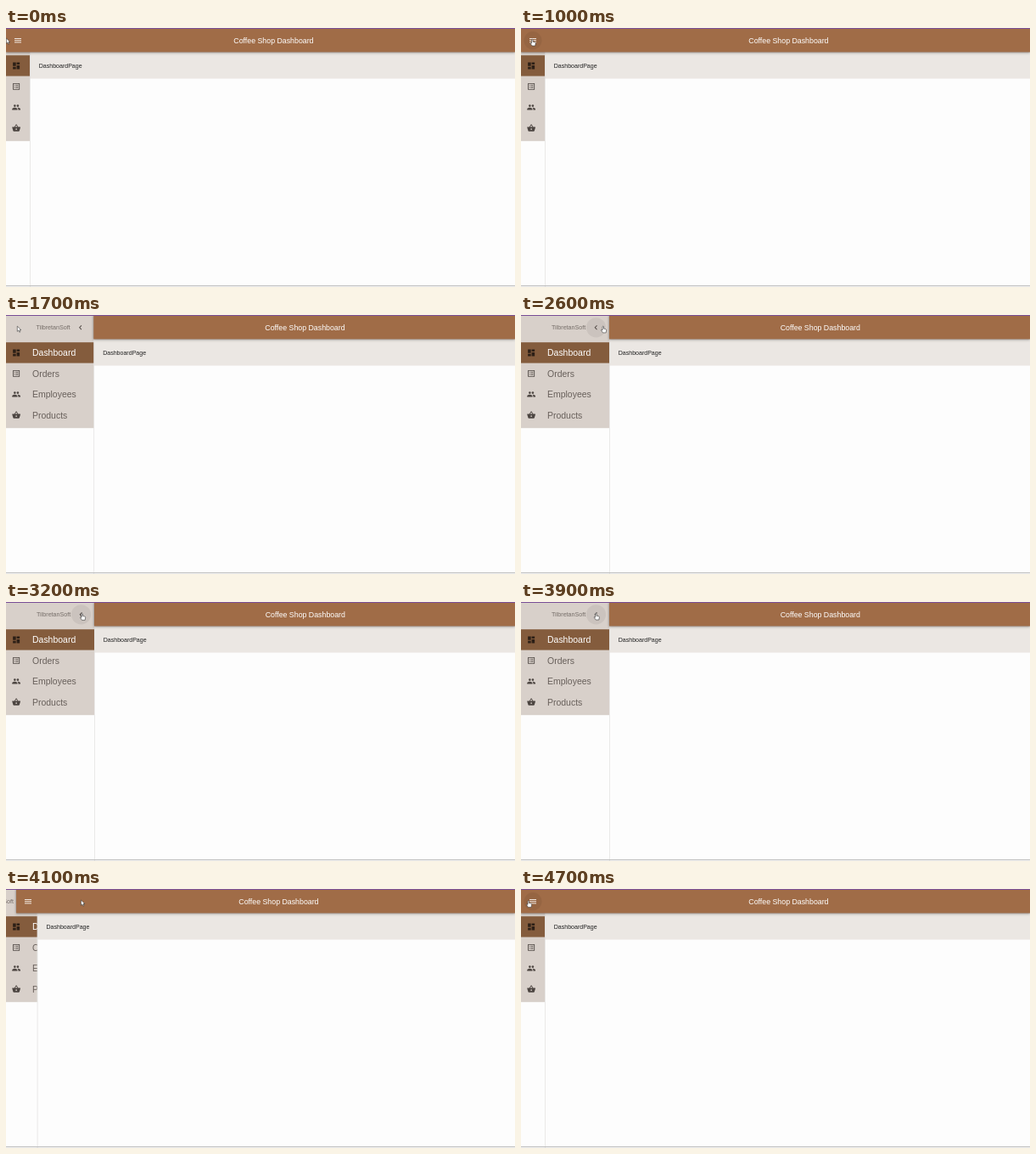
An HTML page for the animation above (5 s loop, 600x305 px).

```html
<!DOCTYPE html>
<html lang="en">
<head>
<meta charset="utf-8">
<title>Coffee Shop Dashboard</title>
<style>
  html, body { margin: 0; width: 100%; height: 100%; overflow: hidden; background: #fdfdfd; }
  svg { display: block; width: 600px; height: 305px; font-family: "Liberation Sans", Arial, sans-serif; }
  #bar { filter: drop-shadow(0 .8px .8px rgba(0,0,0,.28)) drop-shadow(0 1px 1.6px rgba(0,0,0,.22)); }
  .hover { fill: #000; fill-opacity: .06; }
  .label { font-size: 10.48px; fill: #68605b; }
  .icon { fill: #4c4541; }
  .active .label { fill: #fff; }
  .active .icon { fill: #2c1f16; }
  .cursor { fill: #fff; stroke: #2a2a2a; stroke-width: .55; stroke-linejoin: round; }
</style>
</head>
<body>
<svg viewBox="0 0 600 305">
  <defs><clipPath id="clip"><rect id="clipBox" width="104" height="305"/></clipPath></defs>
  <rect width="600" height="305" fill="#fdfdfd"/>

  <g id="main">
    <rect y="28" width="600" height="31.6" fill="#ebe7e3"/>
    <text x="10.7" y="46.8" font-size="7.06" fill="#222">DashboardPage</text>
  </g>

  <g clip-path="url(#clip)">
    <rect width="104" height="305" fill="#fdfdfd"/>
    <rect width="104" height="133.2" fill="#d8d0ca"/>
    <g id="brand">
      <circle id="backHover" class="hover" cx="88.5" cy="14.8" r="11.6"/>
      <text x="76.3" y="17.3" font-size="7.16" fill="#756d68" text-anchor="end">TilbretanSoft</text>
      <path class="icon" transform="translate(83 9.4) scale(.444)" d="M15.4 7.4 14 6l-6 6 6 6 1.4-1.4L10.8 12z"/>
    </g>
    <g id="items"></g>
  </g>
  <rect id="edge" y="0" width=".6" height="305" fill="#dedcda"/>

  <g id="bar">
    <rect id="barBox" width="600" height="28.4" fill="#a06c47"/>
  </g>
  <g id="menu">
    <circle id="menuHover" class="hover" cx="14" cy="14.7" r="10.6"/>
    <path d="M10 12.5h8M10 14.7h8M10 16.9h8" stroke="#f6efe9" stroke-width=".95"/>
  </g>
  <text id="title" y="17.7" font-size="8.81" fill="#fff" text-anchor="middle">Coffee Shop Dashboard</text>

  <rect width="600" height="1" fill="#7a4f98"/>
  <rect y="303.2" width="600" height="1" fill="#b5b5b5"/>

  <path id="arrow" class="cursor" d="M0 0v6.2l1.5-1.3 1 2.2 1.1-.5-1-2.1h2z"/>
  <path id="hand" class="cursor" d="M-.7.6Q0-.3.7.6v2.5l2.3.5q1 .3.9 1.4L3.4 7.9H-.3L-2.2 5.1q-.2-1 .7-.7l.8.6z"/>
</svg>
<script>
const LOOP = 5000, STEP = 100;
const OPEN_AT = 1488, CLOSE_AT = 3927, SLIDE = 225;
const NARROW = 28, WIDE = 104;
const $ = id => document.getElementById(id);

const items = [
  ["Dashboard", "M3 13h8V3H3zm0 8h8v-6H3zm10 0h8V11h-8zm0-18v6h8V3z"],
  ["Orders", "M19 5v14H5V5zm1-2H4q-1 0-1 1v16q0 1 1 1h16q1 0 1-1V4q0-1-1-1zM11 7h6v2h-6zm0 4h6v2h-6zm0 4h6v2h-6zM7 7h2v2H7zm0 4h2v2H7zm0 4h2v2H7z"],
  ["Employees", "M16 11a3 3 0 1 0 0-6 3 3 0 0 0 0 6zm-8 0a3 3 0 1 0 0-6 3 3 0 0 0 0 6zm0 2c-2.3 0-7 1.2-7 3.5V19h14v-2.5c0-2.3-4.7-3.5-7-3.5zm8 0-1 .1c1.2.8 2 1.9 2 3.4V19h6v-2.5c0-2.3-4.7-3.5-7-3.5z"],
  ["Products", "M17.2 9l-4.4-6.6q-.8-.8-1.6 0L6.8 9H2q-1.2.2-1 1.3l2.6 9.2Q4 21 5.500 21h13q1.500 0 1.900-1.500L23 10.300Q23.100 9.200 22 9zM9 9l3-4.400L15 9zm3 8a2 2 0 1 1 0-4 2 2 0 0 1 0 4z"]
];
$("items").innerHTML = items.map(([name, icon], i) => `
  <g transform="translate(0 ${32.2 + i * 24.45})" class="${i ? "" : "active"}">
    ${i ? "" : '<rect width="104" height="24.4" fill="#845c3d"/>'}
    <path class="icon" fill-rule="evenodd" transform="translate(6.8 6.9) scale(.444)" d="${icon}"/>
    <text class="label" x="31" y="16">${name}</text>
  </g>`).join("");

// Pointer tip: time, x, y
const track = [
  [0, .3, 12], [600, 13.3, 13], [2000, 13.3, 13.2], [2600, 96.8, 13],
  [3300, 88.6, 13.5], [4100, 88.4, 13], [4400, 44, 13.5], [4700, 8.7, 13.5], [5000, 8.7, 13.5]
];

function pointer(t) {
  const i = track.findIndex(k => k[0] > t);
  const [a, b] = [track[i - 1], track[i]];
  const u = (t - a[0]) / (b[0] - a[0]);
  return [a[1] + (b[1] - a[1]) * u, a[2] + (b[2] - a[2]) * u];
}

// cubic-bezier(.4, 0, .6, 1)
function sharp(x) {
  if (x <= 0) return 0;
  if (x >= 1) return 1;
  let lo = 0, hi = 1;
  for (let i = 0; i < 24; i++) {
    const s = (lo + hi) / 2, r = 1 - s;
    if (1.2 * r * r * s + 1.8 * r * s * s + s * s * s < x) lo = s; else hi = s;
  }
  return lo * lo * (3 - 2 * lo);
}

const move = (id, x, y = 0) => $(id).setAttribute("transform", `translate(${x} ${y})`);
const show = (id, on) => $(id).setAttribute("visibility", on ? "inherit" : "hidden");

function draw(t) {
  const isOpen = t >= OPEN_AT && t < CLOSE_AT;
  const p = sharp((t - OPEN_AT) / SLIDE) - sharp((t - CLOSE_AT) / SLIDE);
  const left = WIDE * p;
  const width = NARROW + (WIDE - NARROW) * p;

  $("clipBox").setAttribute("width", width);
  $("edge").setAttribute("x", width);
  move("main", width);
  move("brand", width - WIDE);
  $("barBox").setAttribute("x", left);
  $("barBox").setAttribute("width", 600 - left);
  move("menu", left);
  show("menu", !isOpen);
  $("title").setAttribute("x", (isOpen ? 300.8 : 315.4) + left / 2);

  const [x, y] = pointer(t);
  const near = cx => Math.abs(x - cx) < 11;
  const onMenu = !isOpen && near(14 + left);
  const onBack = isOpen && x < left && near(width - 15.5);
  show("menuHover", onMenu);
  show("backHover", onBack);
  show("hand", onMenu || onBack);
  show("arrow", !onMenu && !onBack);
  move("hand", x, y);
  move("arrow", x, y);
}

const start = performance.now();
function tick() {
  const t = (performance.now() - start) % LOOP;
  draw(Math.floor(t / STEP) * STEP);
  requestAnimationFrame(tick);
}
tick();
</script>
</body>
</html>
```
